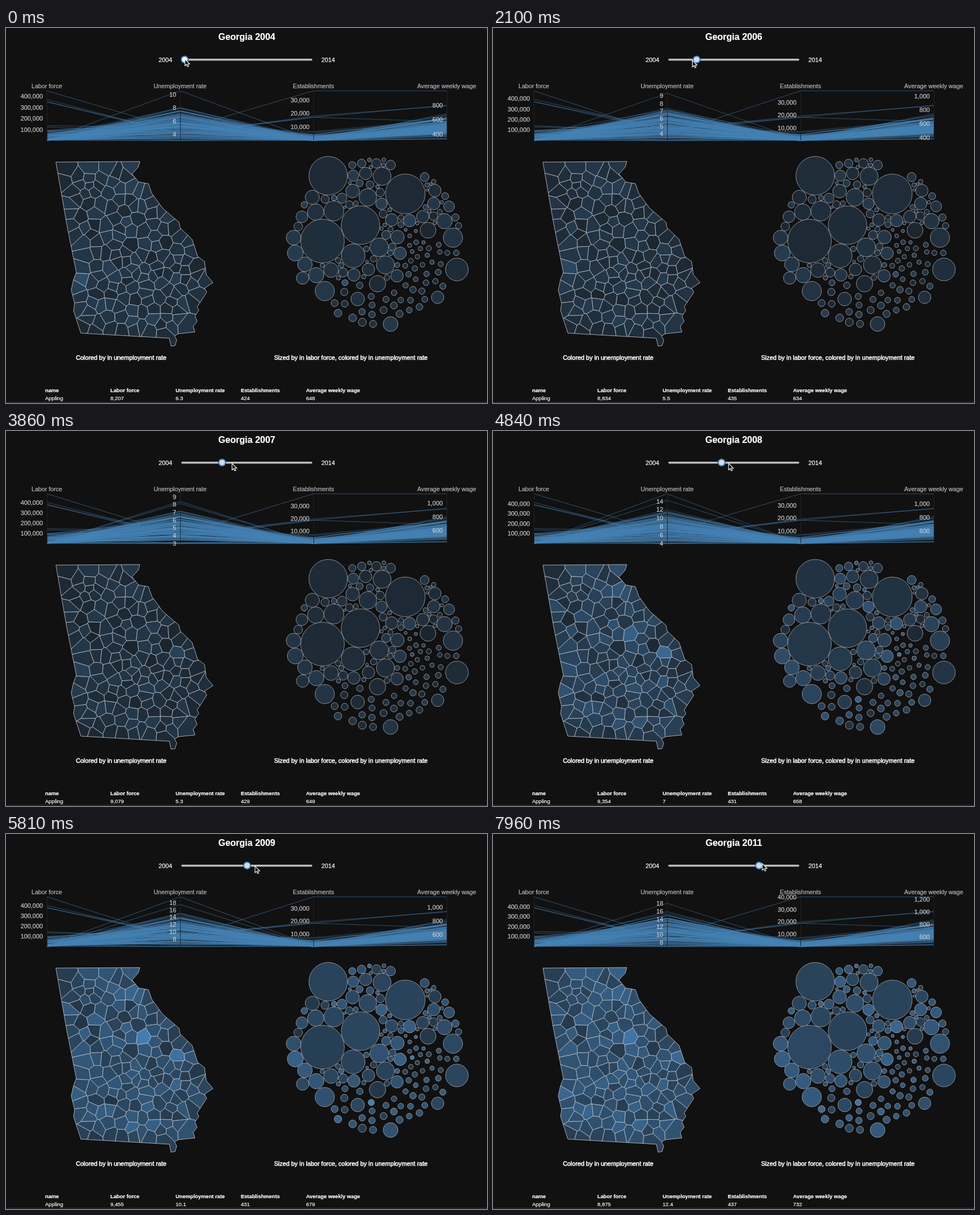
An HTML page with a canvas for the animation above (8 s loop, 848 px wide and 660 px high).

```html
<!DOCTYPE html>
<html lang="en">
<head>
<meta charset="utf-8">
<title>Georgia labor data</title>
<style>
html, body { margin: 0; width: 100%; height: 100%; overflow: hidden; background: #111; }
canvas { display: block; }
</style>
</head>
<body>
<canvas id="stage" width="848" height="660"></canvas>
<script>
const ctx = document.getElementById('stage').getContext('2d');
const LOOP = 8000, COUNT = 159, PACKED = 100, TOP = 110.5, BOTTOM = 198;
const FONT = '"Liberation Sans", Arial, sans-serif';

let seed = 20;
function rnd() {
  seed = seed + 0x6D2B79F5 | 0;
  let t = Math.imul(seed ^ seed >>> 15, 1 | seed);
  t = t + Math.imul(t ^ t >>> 7, 61 | t) ^ t;
  return ((t ^ t >>> 14) >>> 0) / 4294967296;
}
const bell = () => rnd() + rnd() + rnd() - 1.5;
const clamp = v => Math.max(0, Math.min(1, v));

// labor max (thousands), unemployment range, establishments max, wage range, table row
const years = [
  [453, 3.1, 10.55, 37000, 313, 999, '8,207|6.3|424|648'],
  [465, 3.1, 10.2, 38300, 336, 1040, '8,588|5.7|430|626'],
  [476, 3.1, 9.7, 39400, 359, 1080, '8,834|5.5|435|634'],
  [489, 3, 9.4, 39900, 408, 1140, '9,079|5.3|429|649'],
  [499, 4, 15.8, 39400, 415, 1150, '9,354|7|431|658'],
  [489, 6.1, 19.6, 39400, 425, 1157, '9,455|10.1|431|679'],
  [489, 7.1, 22.9, 39400, 445, 1195, '8,746|11.8|433|694'],
  [499, 6.95, 19.8, 40400, 445, 1240, '8,875|12.4|437|732']
];

// cursor path: time, x
const path = [
  [1040, 315], [1300, 320], [2010, 349], [2100, 351], [2450, 351], [3170, 369], [3780, 391],
  [3860, 398], [4750, 412], [5010, 420], [5400, 420], [5810, 438.5], [6290, 439], [7080, 457], [LOOP, 475]
];

const outline = [
  [88, 236], [236, 235], [233, 245], [222, 257], [234, 271], [251, 274], [257, 291], [276, 317],
  [305, 342], [307, 352], [328, 372], [338, 402], [350, 411], [353, 434], [365, 448], [350, 458],
  [354, 465], [337, 491], [340, 497], [333, 507], [337, 516], [330, 525], [333, 535], [304, 538],
  [297, 542], [301, 549], [298, 559], [291, 560], [288, 546], [132, 537], [119, 497],
  [121, 485], [115, 461], [119, 443], [124, 430], [107, 345]
];

// counties that stand out: x, y, year of highest unemployment, strength
const notable = [
  [135, 440, 0, .7], [136, 424, 2, .65], [182, 422, 0, .3], [243, 357, 5.5, 1], [262, 345, 3, .3],
  [304, 392, 4, .7], [325, 390, 7, .4], [250, 480, 6, .35], [248, 452, 3, .35]
];

// the largest bubbles: x, y, radius
const bubbles = [
  [558, 375, 38.5], [704, 292, 35], [568, 260, 34], [625, 347, 34], [612, 401, 21], [795, 425, 20],
  [578, 322, 17.5], [788, 369, 17], [562, 463, 17], [658, 386, 16.5], [663, 261, 16], [669, 417, 16],
  [638, 298, 15.5], [546, 324, 14.5], [655, 450, 14.5], [744, 356, 14], [510, 396, 14], [773, 340, 13.5],
  [547, 435, 13.5], [527, 416, 13], [507, 369, 13], [573, 426, 13], [678, 521, 13], [540, 298, 12.5],
  [611, 287, 12], [620, 477, 12], [690, 368, 12], [761, 474, 11], [523, 440, 11], [634, 256, 11]
];

const fromCenter = (x, y) => Math.hypot(x - 655, y - 380);
const isLoose = (x, y) => y > 440 || (x > 695 && y > 350);
const gapAt = (x, y) => Math.min(...bubbles.map(b => Math.hypot(x - b[0], y - b[1]) - b[2]));
const anyPoint = () => [500 + rnd() * 310, 225 + rnd() * 310];

// upper left: always fill the widest gap
while (bubbles.length < PACKED) {
  let best = [0, 0, 0];
  for (let k = 0; k < 250; k++) {
    const [x, y] = anyPoint();
    if (isLoose(x, y) || (x > 680 && y < 262)) continue;
    const r = Math.min(gapAt(x, y) - .4, 152 - fromCenter(x, y), 11);
    if (r > best[2]) best = [x, y, r];
  }
  bubbles.push(best);
}
// lower right: scattered, growing outwards
for (let k = 0; k < 40000 && bubbles.length < COUNT; k++) {
  const [x, y] = anyPoint();
  const r = 2.4 + Math.hypot(x - 712, y - 350) / 55 + rnd() * 1.4;
  if (isLoose(x, y) && fromCenter(x, y) < 142 && gapAt(x, y) > r + 4) bubbles.push([x, y, r]);
}

function trace(points) {
  const p = new Path2D();
  points.forEach(([x, y]) => p.lineTo(x, y));
  p.closePath();
  return p;
}

function edgeDistance(x, y) {
  return Math.min(...outline.map(([ax, ay], i) => {
    const [bx, by] = outline[(i + 1) % outline.length];
    const dx = bx - ax, dy = by - ay;
    const t = clamp(((x - ax) * dx + (y - ay) * dy) / (dx * dx + dy * dy));
    return Math.hypot(x - ax - t * dx, y - ay - t * dy);
  }));
}

// well spread county centers inside the state
const state = trace(outline);
const centers = notable.map(n => n.slice(0, 2));
while (centers.length < COUNT) {
  let best = null, bestScore = -1;
  for (let k = 0; k < 14; k++) {
    const x = 88 + rnd() * 275, y = 236 + rnd() * 322;
    if (!ctx.isPointInPath(state, x, y)) continue;
    const near = Math.min(...centers.map(c => Math.hypot(x - c[0], y - c[1])));
    const score = Math.min(near, 2 * edgeDistance(x, y));
    if (score > bestScore) { bestScore = score; best = [x, y]; }
  }
  if (best) centers.push(best);
}

// the part of a polygon closer to a than to b
function cut(poly, a, b) {
  const nx = b[0] - a[0], ny = b[1] - a[1];
  const side = p => (p[0] - (a[0] + b[0]) / 2) * nx + (p[1] - (a[1] + b[1]) / 2) * ny;
  const out = [];
  poly.forEach((p, i) => {
    const q = poly[(i + 1) % poly.length], s = side(p), e = side(q);
    if (s <= 0) out.push(p);
    if (s * e < 0) {
      const t = s / (s - e);
      out.push([p[0] + t * (q[0] - p[0]), p[1] + t * (q[1] - p[1])]);
    }
  });
  return out;
}

const counties = centers.map((c, i) => {
  let poly = [[60, 200], [400, 200], [400, 600], [60, 600]];
  centers.forEach(o => { if (o !== c) poly = cut(poly, c, o); });
  const bubble = bubbles[bubbles.length - 1 - i] || [0, 0, 0];
  const labor = (bubble[2] / 38.5) ** 2, first = labor === 1;
  return {
    shape: trace(poly),
    bubble,
    labor,
    shops: first ? 1 : labor * .6,
    wage: first ? 1 : Math.max(0, .25 + bell() * .22 + labor * .5),
    base: labor > .2 ? .2 + bell() * .06 : .29 + bell() * .3,
    phase: rnd() * 6.28
  };
});

function jobless(c, i, n) {
  if (i >= notable.length) return clamp(c.base + .05 * Math.sin(c.phase + n * 1.7));
  const [, , peak, strength] = notable[i];
  return clamp(.3 + strength * Math.exp(-(((n - peak) / 2) ** 2)));
}

function shade(rate) {
  const t = clamp((rate - 3) / 18.5);
  const mix = (a, b) => Math.round(a + (b - a) * t);
  return `rgb(${mix(27, 72)},${mix(37, 134)},${mix(46, 190)})`;
}

function text(str, x, y, size, align = 'left', color = '#fff', weight = '', stroke = .2) {
  ctx.font = `${weight} ${size}px ${FONT}`;
  ctx.textAlign = align;
  ctx.textBaseline = 'middle';
  ctx.fillStyle = ctx.strokeStyle = color;
  ctx.lineWidth = stroke;
  ctx.fillText(str, x, y + .7);
  ctx.strokeText(str, x, y + .7);
}

function disc(x, y, r, color) {
  ctx.fillStyle = color;
  ctx.beginPath();
  ctx.arc(x, y, r, 0, 7);
  ctx.fill();
}

function drawSlider(n, t) {
  text('2004', 281, 56.5, 10.9, 'center');
  text('2014', 568, 56.5, 10.9, 'center');
  ctx.fillStyle = '#bbb';
  ctx.beginPath();
  ctx.roundRect(309, 54, 231, 3.5, 1.7);
  ctx.fill();
  const x = 315 + 22 * n;
  disc(x, 55.5, 7, '#1d4f82');
  disc(x, 55.5, 6.2, '#5a9fe0');
  disc(x, 55.5, 4.6, t < 890 ? '#fff' : '#d9dce2');
}

function drawLines(n) {
  const [labor, uMin, uMax, shops, wMin, wMax] = years[n];
  const range = uMax - uMin;
  const axes = [
    ['Labor force', 900, labor * 1000, 1e5],
    ['Unemployment rate', uMin, uMax, range > 15 ? 5 : range > 7 ? 2 : 1],
    ['Establishments', 10, shops, 1e4],
    ['Average weekly wage', wMin, wMax, 200]
  ];
  const axisX = k => 72 + 235 * k;
  const height = q => BOTTOM - q * (BOTTOM - TOP);
  ctx.strokeStyle = 'rgba(70,130,180,.38)';
  ctx.lineWidth = 1.4;
  counties.forEach((c, i) => {
    ctx.beginPath();
    [c.labor, jobless(c, i, n), c.shops, c.wage].forEach((q, k) => ctx.lineTo(axisX(k), height(q)));
    ctx.stroke();
  });
  axes.forEach(([name, min, max, step], k) => {
    const x = axisX(k);
    ctx.fillStyle = '#222';
    ctx.fillRect(x, TOP, 1, BOTTOM - TOP);
    text(name, x, 102, 10.7, 'center', '#bbb');
    for (let v = Math.ceil(min / step) * step; v <= max; v += step)
      text(v.toLocaleString('en-US'), x - 7, height((v - min) / (max - min)), 10.9, 'right', '#ccc');
  });
}

function drawCharts(n) {
  const [, uMin, uMax] = years[n];
  const colors = counties.map((c, i) => shade(uMin + (uMax - uMin) * jobless(c, i, n)));
  ctx.save();
  ctx.clip(state);
  counties.forEach((c, i) => {
    ctx.fillStyle = colors[i];
    ctx.fill(c.shape);
  });
  ctx.strokeStyle = '#ccd4da';
  ctx.lineWidth = .55;
  counties.forEach(c => ctx.stroke(c.shape));
  ctx.restore();
  ctx.lineWidth = .8;
  ctx.stroke(state);
  ctx.strokeStyle = '#a5a9ac';
  ctx.lineWidth = .8;
  counties.forEach((c, i) => {
    if (!c.bubble[2]) return;
    disc(...c.bubble, colors[i]);
    ctx.stroke();
  });
  text('Colored by in unemployment rate', 203, 580.5, 10.85, 'center', '#fff', '', .55);
  text('Sized by in labor force, colored by in unemployment rate', 608, 580.5, 10.85, 'center', '#fff', '', .55);
}

function drawTable(n) {
  const heads = ['name', 'Labor force', 'Unemployment rate', 'Establishments', 'Average weekly wage'];
  const row = ['Appling', ...years[n][6].split('|')];
  heads.forEach((h, k) => {
    text(h, 69 + 115 * k, 637.5, 9.3, 'left', '#fff', 'bold');
    text(row[k], 69 + 115 * k, 651.5, 9.5);
  });
  ctx.fillStyle = '#3a3a3a';
  ctx.fillRect(0, 658, 848, 1);
}

function cursorX(t) {
  const k = path.findIndex(p => p[0] > t);
  if (k < 1) return path[0][1];
  const [t0, x0] = path[k - 1], [t1, x1] = path[k];
  return x0 + (x1 - x0) * (t - t0) / (t1 - t0);
}

function drawCursor(t) {
  const rise = 5 * clamp((t - 5600) / 2400), dip = 2 * clamp((t - 1040) / 400);
  ctx.save();
  ctx.translate(cursorX(t) + .5, 55 + dip - rise);
  const arrow = trace([[0, 0], [0, 11.5], [2.7, 9], [4.5, 13], [6.5, 12.2], [4.8, 8.3], [8.3, 8.3]]);
  ctx.fillStyle = '#000';
  ctx.strokeStyle = '#fff';
  ctx.lineWidth = 1.1;
  ctx.fill(arrow);
  ctx.stroke(arrow);
  ctx.restore();
}

function draw(now) {
  const t = now % LOOP;
  // the year follows the cursor with a short delay
  const n = Math.floor((cursorX(t - 90) - 304) / 22);
  ctx.fillStyle = '#111';
  ctx.fillRect(0, 0, 848, 660);
  text('Georgia ' + (2004 + n), 424.5, 16, 16, 'center', '#fff', 'bold');
  drawSlider(n, t);
  drawLines(n);
  drawCharts(n);
  drawTable(n);
  drawCursor(t);
}

const began = performance.now();
function tick() {
  draw(performance.now() - began);
  requestAnimationFrame(tick);
}
tick();
</script>
</body>
</html>
```
